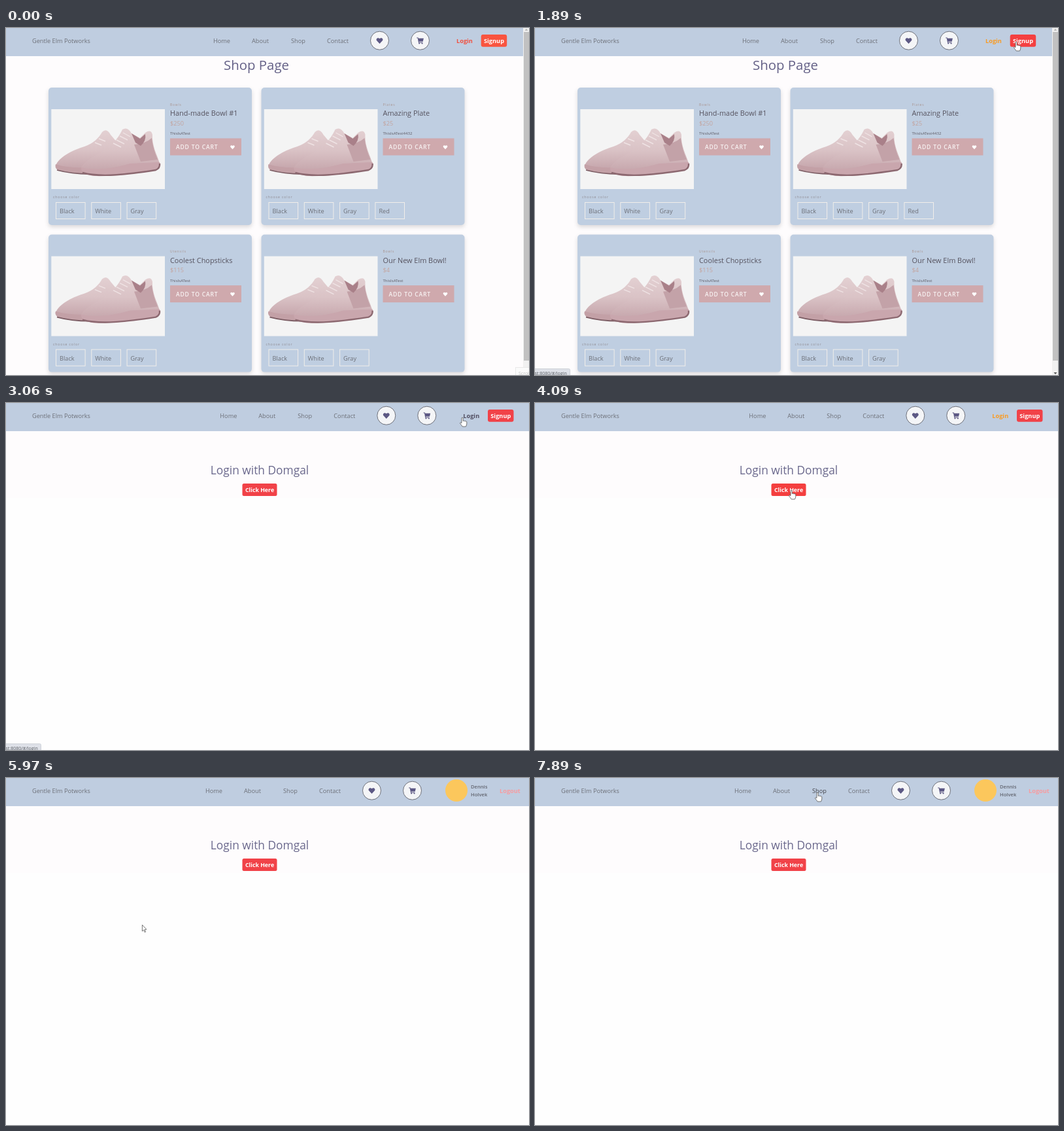
Recreate the animation shown at these times as an HTML page. Size 800 by 530 pixels, loop 8 s.

```html
<!DOCTYPE html>
<html lang="en">
<head>
<meta charset="utf-8">
<title>Shop page</title>
<style>
html, body { margin: 0; width: 100%; height: 100%; overflow: hidden; background: #fefefe; }
svg { display: block; width: 800px; height: 530px; font-family: "Open Sans", "Noto Sans", sans-serif; }
.card { filter: drop-shadow(0 3px 3px rgba(0, 0, 0, .14)); }
</style>
</head>
<body>
<svg id="stage" viewBox="0 0 800 530">
  <defs>
    <linearGradient id="knit" x2="0" y2="1">
      <stop stop-color="#e3d0d2"/><stop offset=".5" stop-color="#dac3c6"/><stop offset="1" stop-color="#c5a5ab"/>
    </linearGradient>
    <path id="heart" d="M0 4.6L-4.4 0C-6.2-2.4-3-6 0-3C3-6 6.2-2.4 4.4 0Z"/>
    <g id="cart">
      <path d="M-5.3-4.8h2.3l.4 1.3H5.4L4.2 1.4H-1.7l.2 1H3.8v1H-2.4L-3.8-3.8H-5.3z"/>
      <circle cx="-1.4" cy="4.3" r="1"/><circle cx="3.1" cy="4.3" r="1"/>
    </g>
    <g id="shoes">
      <rect x="69.3" y="124" width="173.7" height="122" fill="#f4f4f4"/>
      <path d="M77 208C84 195 104 186 120 181C134 176 142 168 147 159Q154 152 160 163L176 182L150 216H100Q78 216 77 208Z" fill="url(#knit)"/>
      <path d="M76 208C92 214 120 214 140 212L130 222C110 223 90 221 79 217Q74 213 76 208Z" fill="#c3a0a6"/>
      <path d="M78 217Q100 223 128 223" fill="none" stroke="#7b5c63" stroke-width="1.8"/>
      <path d="M115 213C122 200 148 190 160 180C170 170 176 160 178 155Q186 150 192 161L205 168L213 160Q222 154 224 163C223 180 231 193 235 207L228 214L140 220Q113 220 115 213Z" fill="url(#knit)"/>
      <path d="M196 178Q213 177 223 168Q225 185 232 201L206 204Z" fill="#c3a2a8"/>
      <path d="M192 161L205 169L213 162Q215 172 206 180L198 175Z" fill="#a98089"/>
      <path d="M115 213C140 219 170 213 190 207L235 205Q238 214 229 217C200 222 165 227 135 226Q113 223 115 213Z" fill="#c9a6ad"/>
      <path d="M117 221C145 229 190 223 229 217Q236 214 235 207" fill="none" stroke="#8c6870" stroke-width="2.4"/>
      <path d="M164 176l12 6M169 171l12 6M174 165l12 6M179 160l11 6M136 175l10 4M142 169l10 4" stroke="#efe3e4" stroke-width="1.4"/>
    </g>
  </defs>
  <rect width="800" height="530" fill="#fefefe"/>
  <rect id="page" width="800" fill="#fefcfd"/>
  <g id="shop"></g>
  <g id="login"></g>
  <rect id="bar" height="43" fill="#bfcde0"/>
  <g id="nav"></g>
  <g id="status"></g>
  <circle id="glow" r="8" fill="#d9d800" opacity=".72"/>
  <g id="cursor" stroke="#555" stroke-width=".8" stroke-linejoin="round" fill="#fff">
    <path id="arrow" d="M.4.4V10L2.6 8L4.2 11.6L5.6 11L4.1 7.5L6.9 7.2Z"/>
    <path id="hand" d="M-1 7.5V.8Q0-.8 1.2.8V5.5L2.4 5.1L3.6 5.7L5 5.6L6.8 6.6V10Q6.6 12 5.4 14H.2Q-1.5 11.5-3.6 8.8Q-3.2 6.8-1 8.6Z"/>
  </g>
</svg>
<script>
const $ = id => document.getElementById(id);
const text = (x, y, s, size, fill, more = '') =>
  `<text x="${x}" y="${y}" font-size="${size}" fill="${fill}" ${more}>${s}</text>`;
const rect = (x, y, w, h, fill, more = '') =>
  `<rect x="${x}" y="${y}" width="${w}" height="${h}" fill="${fill}" ${more}/>`;
const use = (id, x, y, fill, k = 1) =>
  `<use href="#${id}" transform="translate(${x} ${y}) scale(${k})" fill="${fill}"/>`;
const bold = 'font-weight="700"';

function card(x, y, [kind, title, price, note, colors]) {
  const options = colors.map((c, i) =>
    rect(76.5 + i * 54.3, 266.5, 44.6, 25, 'none', 'stroke="#f1eeea"') +
    text(82 + i * 54.3, 283, c, 9.2, '#6b6e76')).join('');
  return `<g transform="translate(${x} ${y})">` +
    rect(65, 91, 311, 210, '#bfcee1', 'rx="5" class="card"') +
    '<use href="#shoes"/>' +
    text(251, 118.5, kind, 5, '#a8948f', 'letter-spacing=".8"') +
    text(251, 134, title, 10.9, '#56535f') +
    text(251, 148.7, price, 9.2, '#c3a49f') +
    text(251, 163, note, 6.1, '#5c5a64') +
    rect(251, 168.5, 109, 26, '#cfa9ad') +
    text(260, 185, 'ADD TO CART', 8.6, '#f8f3f3', 'font-weight="600" letter-spacing=".8"') +
    use('heart', 346.5, 182, '#fff', .68) +
    text(72, 260, 'choose color', 5, '#8f8a90', 'letter-spacing=".93"') +
    options + '</g>';
}

const basic = ['Black', 'White', 'Gray'];
const items = [
  ['Bowls', 'Hand-made Bowl #1', '$250', 'ThisIsATest', basic],
  ['Plates', 'Amazing Plate', '$25', 'ThisIsATest4432', [...basic, 'Red']],
  ['Utensils', 'Coolest Chopsticks', '$115', 'ThisIsATest', basic],
  ['Bowls', 'Our New Elm Bowl!', '$4', 'ThisIsATest', basic]
];
$('shop').innerHTML =
  text(383, 64, 'Shop Page', 20.4, '#646187', 'text-anchor="middle"') +
  items.map((item, i) => card(i % 2 * 325.5, (i >> 1) * 224.6, item)).join('') +
  rect(791, 0, 9, 530, '#f1f1f1') + rect(792, 6, 8, 502, '#c1c1c1') +
  '<path d="M793.5 4l2.5-3l2.5 3z" fill="#b5b5b5"/>' +
  '<path d="M793.5 526l2.5 3l2.5-3z" fill="#555"/>' +
  '<g id="tip">' + rect(779.5, 518.5, 24, 14, '#fbfbfb', 'stroke="#e9e9e9"') +
  text(784, 530, 'Scroll', 7, '#c4c4c4') + '</g>';
$('login').innerHTML =
  text(388, 109, 'Login with Domgal', 17.35, '#6b698d', 'text-anchor="middle"') +
  rect(361.5, 123, 53, 19, '#f14248', 'rx="2.5" id="go"') +
  text(388, 136, 'Click Here', 8.8, '#fff', bold + ' text-anchor="middle"');
$('status').innerHTML =
  rect(-5, 520.5, 58.5, 15, '#dee1e8', 'rx="2" stroke="#cfd2d8"') +
  text(-.5, 530, 'st:8080/#/login', 7, '#5c6066');

const round = (x, icon) =>
  `<circle cx="${x}" cy="19.2" r="14" fill="#f4f5f7" stroke="#60636c" stroke-width=".9"/>` +
  use(icon, x, 19.3, '#5c5884');
$('nav').innerHTML = text(40, 23, 'Gentle Elm Potworks', 9.2, '#6d7078') +
  '<g id="links">' +
  [['Home', 317], ['About', 376], ['Shop', 436], ['Contact', 491]]
    .map(([s, x]) => text(x, 23, s, 9.2, '#6d7078', `id="nav${s}"`)).join('') +
  round(571.5, 'heart') + round(633.5, 'cart') +
  '<g id="guest">' + text(689, 23, 'Login', 9.2, '', bold + ' id="in"') +
  rect(726.7, 10, 39.5, 18.7, '', 'rx="3" id="up"') +
  text(731, 23, 'Signup', 9.2, '#fff', bold) + '</g></g>' +
  '<g id="user"><circle cx="689" cy="19" r="17" fill="#fcc75c"/>' +
  text(711, 16, 'Dennis', 7.6, '#62656f', 'font-weight="600"') +
  text(711, 28, 'Holvek', 7.6, '#62656f', 'font-weight="600"') +
  text(755, 23, 'Logout', 9.2, '#f89b9f', bold) + '</g>';

// Pointer path: time, x, y
const path = [
  [70, 793, 430], [400, 768, 190], [870, 733, 25], [1070, 733, 25], [1280, 698, 25],
  [1750, 698, 25], [1890, 736, 21], [2160, 737, 22], [2500, 698, 22], [3320, 698, 22],
  [3700, 560, 75], [4090, 392, 133], [4160, 392, 134], [5030, 392, 134], [5300, 68, 104],
  [5489, 68, 104], [5490, 36, 192], [5970, 208, 224], [6230, 208, 224], [6510, 292, 212],
  [6770, 292, 215], [6980, 382, 227], [7260, 536, 130], [7540, 465, 35], [7610, 465, 35],
  [7890, 432, 22], [8000, 432, 22]
];
function pointer(t) {
  const i = Math.max(1, path.findIndex(p => p[0] > t));
  const [a, x, y] = path[i - 1], [b, u, v] = path[i];
  const k = Math.max(0, (t - a) / (b - a));
  return [x + (u - x) * k, y + (v - y) * k];
}
const show = (id, on) => $(id).style.display = on ? '' : 'none';
const paint = (id, color) => $(id).setAttribute('fill', color);

function draw(t) {
  const within = (a, b) => t >= a && t < b;
  const shop = t < 3060, user = t >= 5700;
  show('shop', shop);
  show('tip', t < 400);
  show('login', !shop);
  show('guest', !user);
  show('user', user);
  $('page').setAttribute('height', shop ? 530 : 145);
  $('bar').setAttribute('width', shop ? 791 : 800);
  $('links').setAttribute('transform', `translate(${shop ? 0 : user ? -12 : 10.3})`);

  const onLogin = within(1140, 1810) || within(2320, 3390);
  const onSignup = within(730, 1140) || within(1810, 2320);
  const onGo = within(4020, 5070), onShop = t >= 7800;
  paint('in', onLogin ? '#514d60' : t < 1140 ? '#f1503f' : '#f99b22');
  paint('up', onSignup ? '#f44040' : t < 730 ? '#f9543f' : shop ? '#fb3d4a' : '#f14248');
  paint('go', onGo ? '#f43f3f' : '#f14248');
  paint('navShop', onShop ? '#42434a' : '#6d7078');

  show('status', within(1480, 3600));
  $('status').setAttribute('opacity', t < 1550 ? .5 : 1);

  const [x, y] = pointer(t), hand = onLogin || onSignup || onGo || onShop;
  show('cursor', t >= 70);
  show('hand', hand);
  show('arrow', !hand);
  $('cursor').setAttribute('transform', `translate(${x} ${y})`);
  show('glow', within(2920, 3060) || within(4820, 4890));
  $('glow').setAttribute('cx', x + .5);
  $('glow').setAttribute('cy', y + .5);
}

let start;
function tick(now) {
  start ??= now;
  draw((now - start) % 8000);
  requestAnimationFrame(tick);
}
draw(0);
requestAnimationFrame(tick);
</script>
</body>
</html>
```
